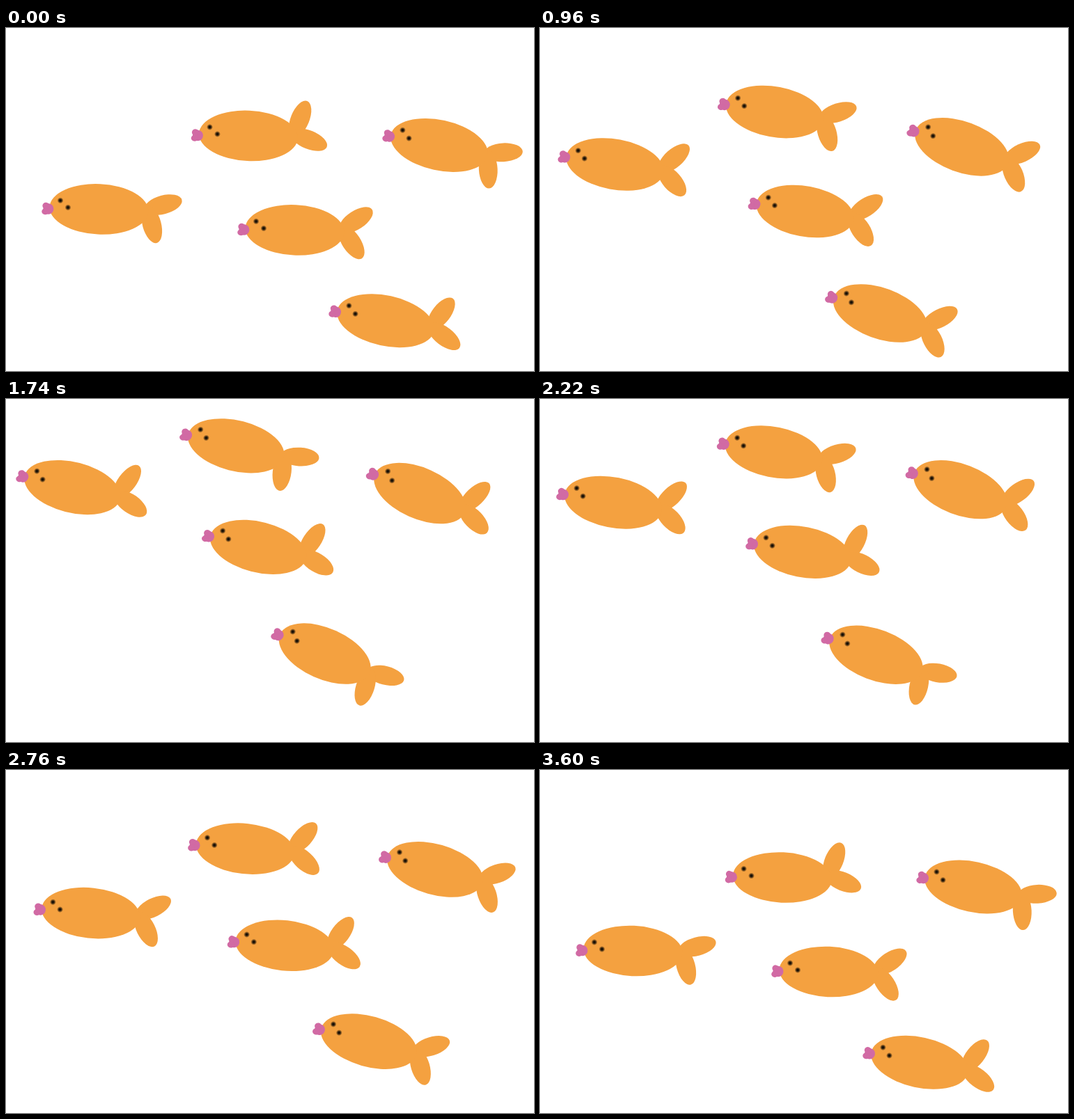
Animation of 758x493 px, one loop 3630 ms. Source, as an HTML page with a canvas:

```html
<!DOCTYPE html>
<html lang="en">
<head>
<meta charset="utf-8">
<title>School of fish</title>
<style>
  html, body { margin: 0; width: 100%; height: 100%; overflow: hidden; background: #fff; }
  canvas { display: block; }
</style>
</head>
<body>
<canvas id="stage" width="758" height="493"></canvas>
<script>
const ctx = document.getElementById('stage').getContext('2d');
const LOOP = 3630;
const RISE = 1600;
const RAD = Math.PI / 180;
const ORANGE = '#f4a140';
const PINK = '#d16aa4';
const PIVOT = { x: 212, y: 96 };
const STRETCH = 1.1; // the school turns in a slightly widened space

// Body centre and tilt; the tail goes from rest by swing degrees, some ms late
const school = [
  { x: 133.5, y: 260.5, tilt: 2.8, rest: 27.3, swing: -53, delay: 0 },
  { x: 348, y: 155, tilt: 2.8, rest: -26, swing: 62, delay: -30 },
  { x: 622, y: 168.5, tilt: 12.4, rest: 30, swing: -54, delay: 110 },
  { x: 414.5, y: 290.5, tilt: 2.8, rest: 11.5, swing: -43, delay: 430 },
  { x: 545, y: 420.8, tilt: 12.4, rest: -22, swing: 60, delay: 350 }
];

// 0 to 1 and back once per loop: a quick rise, then a slower, settling fall
function wave(time) {
  const t = (time + LOOP) % LOOP;
  const phase = t < RISE ? t / RISE : ((LOOP - t) / (LOOP - RISE)) ** 1.2;
  return (1 - Math.cos(Math.PI * phase)) / 2;
}

function ellipse(x, y, rx, ry, color) {
  ctx.fillStyle = color;
  ctx.beginPath();
  ctx.ellipse(x, y, rx, ry, 0, 0, 2 * Math.PI);
  ctx.fill();
}

function eye(x, y) {
  const soft = ctx.createRadialGradient(x, y, 0, x, y, 4.5);
  soft.addColorStop(0, '#000');
  soft.addColorStop(0.4, 'rgba(0, 0, 0, 0.8)');
  soft.addColorStop(1, 'rgba(0, 0, 0, 0)');
  ellipse(x, y, 4.5, 4.5, soft);
}

function mouth() {
  ellipse(-72.5, 3.1, 7.5, 7.8, PINK);
  ellipse(-76.3, -1.2, 5, 4.7, PINK);
  ellipse(-77, 7.2, 5, 4.5, PINK);
}

function tail(angle) {
  ctx.save();
  ctx.translate(65.5, -0.5);
  ctx.rotate(angle * RAD);
  ctx.translate(2.3, -5);
  for (const turn of [-45, 90]) {
    ctx.rotate(turn * RAD);
    ellipse(23, 0, 27.7, 13.4, ORANGE);
  }
  ctx.restore();
}

function fish({ x, y, tilt, rest, swing, delay }, time) {
  ctx.save();
  ctx.translate(x, y);
  ctx.rotate(tilt * RAD);
  tail(rest + swing * wave(time - delay));
  ellipse(0, 0, 71, 36.2, ORANGE);
  mouth();
  eye(-56, -9.8);
  eye(-44.6, -0.3);
  ctx.restore();
}

function draw(time) {
  ctx.clearRect(0, 0, 758, 493);
  ctx.save();
  ctx.translate(PIVOT.x, PIVOT.y + 1 - 115 * wave(time - 200));
  ctx.scale(STRETCH, 1);
  ctx.rotate(13 * wave(time) * RAD);
  ctx.scale(1 / STRETCH, 1);
  ctx.translate(-PIVOT.x, -PIVOT.y);
  school.forEach(member => fish(member, time));
  ctx.restore();
}

const start = performance.now();
function tick() {
  draw((performance.now() - start) % LOOP);
  requestAnimationFrame(tick);
}
tick();
</script>
</body>
</html>
```
